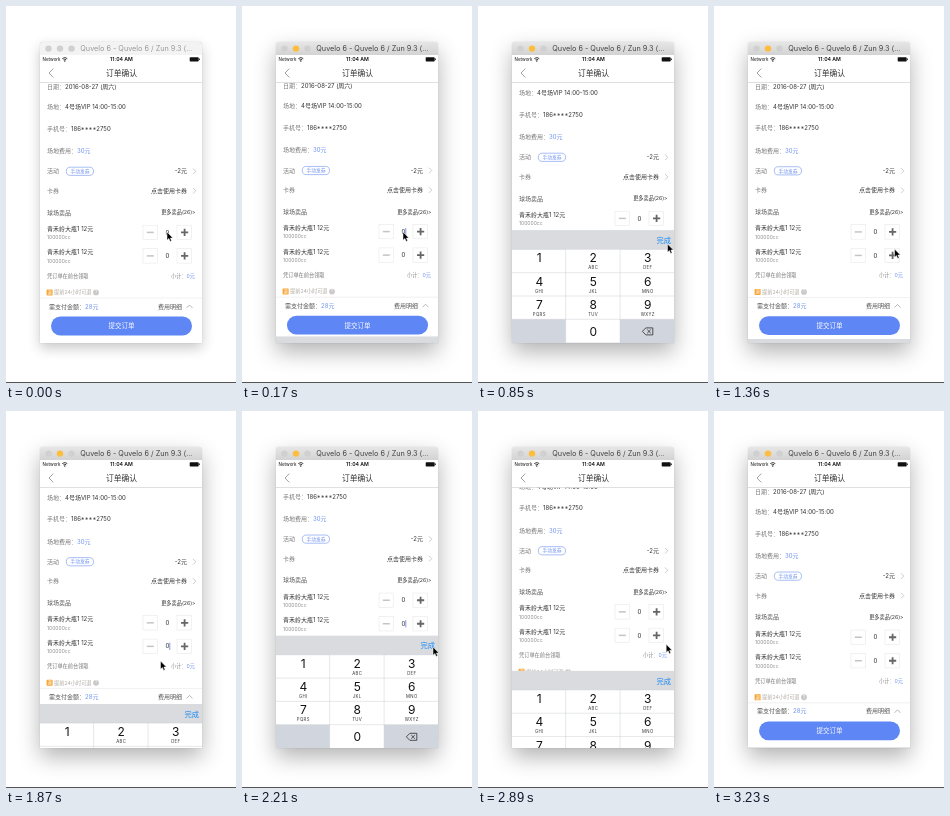
An HTML page for the animation above (3400 ms loop, 230 px wide and 377 px high).

```html
<!DOCTYPE html>
<html lang="zh-CN">
<head>
<meta charset="utf-8">
<style>
html, body { margin: 0; width: 100%; height: 100%; overflow: hidden; background: #fff; }
#win { position: absolute; left: 34px; top: 36px; width: 162px; height: 301px; border-radius: 3px 3px 0 0;
  background: #f3f3f3; box-shadow: 0 5px 13px rgba(0,0,0,.22), 0 0 1px rgba(0,0,0,.25); }
#win.active { background: linear-gradient(#e6e6e6, #d3d3d3 13px);
  box-shadow: 0 9px 22px rgba(0,0,0,.3), 0 0 1px rgba(0,0,0,.3); }
svg { position: absolute; left: 0; top: 0; }
text { font-family: Inter, "Noto Sans CJK SC", "Noto Sans CJK", sans-serif; white-space: pre; }
</style>
</head>
<body>
<div id="win"></div>
<svg id="stage" width="230" height="377" viewBox="0 0 230 377"></svg>
<script>
const LOOP = 3400, STEP = 170;
const INK = '#333', GREY = '#777', PALE = '#8c8c8c', BLUE = '#6f92ee';

// y is the vertical middle of the text
const text = (x, y, s, size = 6, fill = INK, anchor = 'start', extra = '') =>
  `<text x="${x}" y="${y + size * .36}" font-size="${size}" fill="${fill}" text-anchor="${anchor}" ${extra}>${s}</text>`;
const rect = (x, y, w, h, fill, extra = '') =>
  `<rect x="${x}" y="${y}" width="${w}" height="${h}" fill="${fill}" ${extra}/>`;
const line = (d, color, width = .7, extra = '') =>
  `<path d="${d}" fill="none" stroke="${color}" stroke-width="${width}" ${extra}/>`;
const field = (y, label, value, fill = INK) =>
  text(41, y, label + '：', 6, GREY) + text(41 + 6 * (label.length + 1), y, value, 6, fill);
const option = (y, label, value) =>
  text(41, y, label, 6, GREY) + text(181, y, value, 6, INK, 'end') +
  line(`M187 ${y - 2.8}l2.8 2.8l-2.8 2.8`, '#aaa', .6);

function product(y, id) {
  const mid = y + 3.7;
  const box = x => rect(x, mid - 7.2, 14.6, 14.4, '#fff', 'stroke="#e4e4e4" stroke-width=".5"');
  return text(41, y, '青禾岭大瓶1 12元') + text(41, y + 8.7, '100000cc', 5, PALE) +
    box(137) + box(171) +
    line(`M140.8 ${mid}h7`, '#c4c4c4', 1.5) +
    line(`M175 ${mid}h7.2M178.6 ${mid - 3.6}v7.2`, '#666', 1.8) +
    text(161.4, mid, '0', 6, INK, 'middle') +
    rect(163.5, mid - 3.7, .7, 7.4, '#4a6fe0', `id="${id}"`);
}

function page() {
  return rect(34, 40, 162, 350, '#fff') +
    field(81, '日期', '2016-08-27 (周六)') +
    field(101, '场地', '4号场VIP 14:00-15:00') +
    field(122.8, '手机号', '186****2750') +
    field(145, '场地费用', '30元', BLUE) +
    option(165.3, '活动', '-2元') +
    rect(60.3, 161.2, 27.2, 8.2, '#fff', `rx="4.1" stroke="${BLUE}" stroke-width=".6"`) +
    text(74, 165.3, '手动发券', 4.8, BLUE, 'middle') +
    option(184.8, '卡券', '点击使用卡券') +
    text(41, 206.5, '球场卖品', 6, '#555') +
    text(189.5, 206.5, '更多卖品(26)&gt;', 5.2, INK, 'end') +
    product(222.7, 'caretA') + product(246.2, 'caretB') +
    text(41, 270, '凭订单在前台领取', 5.2, GREY) +
    text(189, 270, `小计：<tspan fill="${BLUE}">0元</tspan>`, 5.2, PALE, 'end') +
    rect(40.6, 283.4, 6, 6, '#f7a431', 'rx=".6"') + text(43.6, 286.4, '退', 4.4, '#fff', 'middle') +
    text(48, 286.4, '提前24小时可退', 5.2, '#b0aaa2') +
    '<circle cx="90" cy="286.4" r="2.9" fill="#c8c8c8"/>' + text(90, 286.4, '?', 4.4, '#fff', 'middle') +
    line('M34 292H196', '#e8e8e8', .6) +
    text(43, 300.5, `需支付金额：<tspan fill="${BLUE}">28元</tspan>`, 6, '#555') +
    text(152, 300.5, '费用明细', 6, '#555') + line('M180.5 302l3-3l3 3', '#999') +
    rect(45, 310.6, 141, 18.8, '#5f86f5', 'rx="9.4"') +
    text(115.5, 320, '提交订单', 6.5, '#fff', 'middle');
}

// Drawn from its own top edge at y = 0
function keyboard() {
  const rowH = 23.3, top = 19, cols = [61.3, 115.2, 169.8];
  const letters = ['', 'ABC', 'DEF', 'GHI', 'JKL', 'MNO', 'PQRS', 'TUV', 'WXYZ'];
  let out = rect(34, 0, 162, 113, '#d1d5dd') + rect(34, 0, 162, top, '#d9dbde') +
    text(193, 10, '完成', 7.3, '#1c8af5', 'end') +
    rect(34, top, 162, rowH * 3, '#fff') + rect(87.6, top, 54.5, rowH * 4, '#fff');
  letters.forEach((s, i) => {
    const x = cols[i % 3], y = top + rowH * (i / 3 | 0);
    out += text(x, y + 8.7, i + 1, 12, '#111', 'middle') +
      text(x, y + 18.3, s, 4.3, INK, 'middle', 'letter-spacing=".35"');
  });
  for (let r = 0; r < 4; r++) out += line(`M34 ${top + rowH * r}H196`, '#c8cbd0', .45);
  return out + line(`M87.6 ${top}v94M142.1 ${top}v94`, '#c8cbd0', .45) +
    text(cols[1], 101, '0', 12, '#111', 'middle') +
    line('M164.4 101l3.4-3.5h7v7h-7zM169.2 99.2l3.6 3.6m0-3.6l-3.6 3.6', '#222', .75);
}

function header() {
  const dots = [42.5, 54, 65.5].map(x => `<circle class="dot" cx="${x}" cy="42.6" r="3.2"/>`).join('');
  return dots + text(74.3, 42.6, 'Quvelo 6 - Quvelo 6 / Zun 9.3 (...', 7.25, GREY, 'start', 'id="title"') +
    rect(34, 49, 162, 27.6, '#fff') + line('M34 76.5H196', '#ccc', .6) +
    text(36.5, 53.4, 'Network', 4.5, '#111') +
    line('M56.3 52.6q2.5-2.2 5 0M57.4 53.8q1.4-1.2 2.8 0', '#111', .8) +
    '<circle cx="58.8" cy="55" r=".7" fill="#111"/>' +
    text(115.5, 53.4, '11:04 AM', 5.2, '#111', 'middle', 'font-weight="600"') +
    rect(183.7, 51.2, 9, 4.2, '#111', 'rx=".7"') + rect(193.1, 52.5, .8, 1.6, '#111') +
    line('M47.3 62.6l-4.3 4.4l4.3 4.4', '#777', .7) +
    text(115.5, 67, '订单确认', 7.8, INK, 'middle');
}

const $ = id => document.getElementById(id);
$('stage').innerHTML =
  '<clipPath id="screen"><rect x="34" y="49" width="162" height="288"/></clipPath>' +
  `<g clip-path="url(#screen)"><g id="page">${page()}</g><g id="keys">${keyboard()}</g></g>` +
  header() + rect(0, 376, 230, 1, '#555') +
  '<path id="pointer" d="M0 0V8.2L1.9 6.5L3.2 9.4L4.6 8.8L3.4 6H5.9Z" fill="#000" stroke="#fff" stroke-width=".5"/>';
const dots = [...document.querySelectorAll('.dot')];

// Pointer stops: start time, x, y
const stops = [
  [0, 161, 226], [680, 184, 234], [850, 189.5, 238], [1360, 180.5, 243], [1530, 162, 249],
  [1870, 154.5, 250], [2040, 172, 243], [2210, 191, 236], [2380, 192, 234], [2550, 188.2, 233.3]
];

function spring(t, start) {
  const u = Math.max(0, t - start) * .019;
  return 1 - (1 + u) * Math.exp(-u);
}
const move = (el, x, y) => el.setAttribute('transform', `translate(${x} ${y})`);
const show = (el, on) => el.setAttribute('visibility', on ? 'visible' : 'hidden');
const within = (t, from, to) => t >= from && t < to;

function draw(now) {
  const t = Math.floor(now % LOOP / STEP) * STEP;
  const first = spring(t, 150) - spring(t, 1085);
  const second = spring(t, 1799) - spring(t, 2830);
  move($('page'), 0, -14 * first - 37.3 * second);
  move($('keys'), 0, 337 - 112.6 * (first + second));
  show($('caretA'), within(t, 170, 850));
  show($('caretB'), within(t, 1700, 2550));

  const [, x, y] = stops.filter(s => s[0] <= t).pop();
  move($('pointer'), x, y);
  show($('pointer'), t < 3230);

  const active = t >= 170;
  $('win').className = active ? 'active' : '';
  $('title').setAttribute('fill', active ? '#444' : '#999');
  dots.forEach((d, i) => d.setAttribute('fill', active && i === 1 ? '#fdbe3f' : '#d0d0d0'));
}
const begin = performance.now();
function tick() {
  draw(performance.now() - begin);
  requestAnimationFrame(tick);
}
tick();
</script>
</body>
</html>
```
